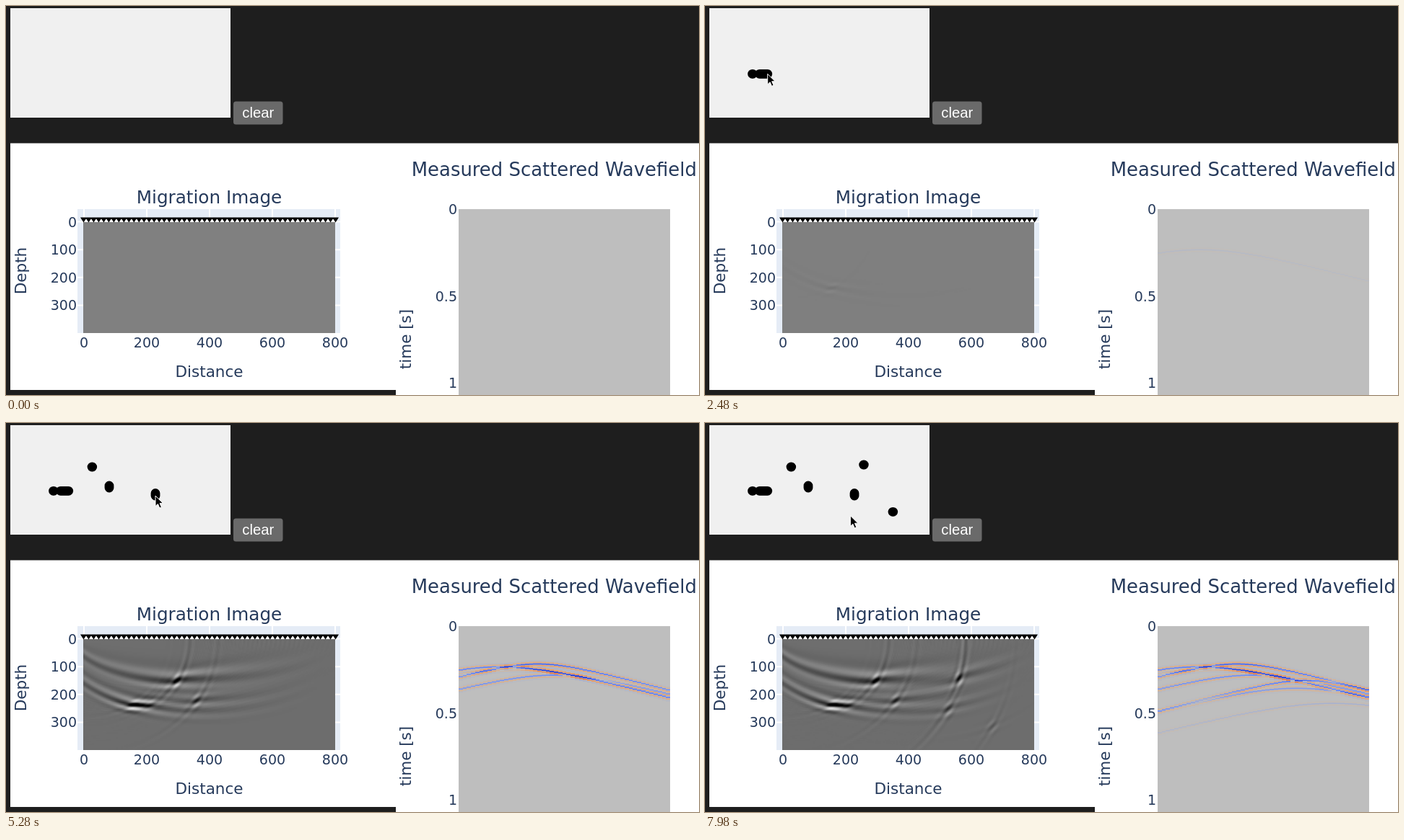
An HTML page with a canvas for the animation above (8000 ms loop, 960 by 540 pixels).

```html
<!DOCTYPE html>
<html lang="en">
<head>
<meta charset="utf-8">
<title>Migration demo</title>
<style>
  html, body { margin: 0; width: 100%; height: 100%; overflow: hidden; background: #1e1e1e; }
  svg, canvas { position: absolute; left: 0; top: 0; }
  #image { left: 107px; top: 299px; width: 349px; height: 154.5px; }
  #wave { left: 627px; top: 282px; width: 293px; height: 258px; image-rendering: pixelated; }
  text { font-family: "DejaVu Sans", Verdana, sans-serif; fill: #263a5b; }
  .tick { font-size: 19px; }
  .axis { font-size: 21.5px; }
  .mid { text-anchor: middle; }
  .end { text-anchor: end; }
  #clear { font: 20.3px "Liberation Sans", Arial, sans-serif; fill: #fff; }
  .line { fill: none; stroke: #ccc; stroke-width: 3; }
</style>
</head>
<body>
<svg width="960" height="540" viewBox="0 0 960 540">
  <rect width="960" height="540" fill="#1e1e1e"/>
  <rect x="6" y="3" width="305" height="152" fill="#f0f0f0"/>
  <rect id="button" x="315" y="132.500" width="68.500" height="32" rx="3.500"/>
  <text id="clear" class="mid" x="349.300" y="155">clear</text>
  <path d="M6 190.500H960V540H540V533H6z" fill="#fff"/>
  <rect x="99" y="282" width="364" height="172" fill="#e5ecf6"/>
  <path id="grid" stroke="#fff" stroke-width="2"/>
  <g id="labels"></g>
  <text class="mid" x="281.500" y="274" font-size="24.700">Migration Image</text>
  <text class="mid" x="759.300" y="236" font-size="25.900">Measured Scattered Wavefield</text>
  <text class="mid axis" x="281.500" y="514.500">Distance</text>
  <text class="mid axis" transform="translate(27.500 367.500) rotate(-90)">Depth</text>
  <text class="mid axis" transform="translate(561 462.500) rotate(-90)">time [s]</text>
</svg>
<canvas id="image" width="200" height="100"></canvas>
<canvas id="wave" width="51" height="258"></canvas>
<svg width="960" height="540" viewBox="0 0 960 540">
  <rect x="107" y="296" width="349" height="4" fill="#fff"/>
  <path id="receivers"/>
  <g id="toolbar" fill="#ccc">
    <path d="M49 205h6l2-4h10l2 4h6v17h-26z"/>
    <circle cx="62" cy="212.500" r="5" stroke="#fff" stroke-width="2.500"/>
    <g stroke="#7d7d7d" fill="none">
      <circle cx="118.500" cy="208.500" r="8.500" stroke-width="3.500"/>
      <path d="M125 215l7 7" stroke-width="4.500"/>
      <rect x="115" y="205" width="7" height="7" stroke-width="2"/>
    </g>
    <path class="line" d="M167 201v20M157 211h20"/>
    <path d="M167 197l5 6h-10zM167 225l5-6h-10zM153.500 211l6-5v10zM180.500 211l-6-5v10z"/>
    <rect class="line" x="202.500" y="200" width="23" height="22" stroke-dasharray="4 3.500"/>
    <path class="line" d="M254 213C247 207 253 200 262 200S274 206 270 211 257 216 253 212 250 217 255 221"/>
    <path d="M308 200h23v22h-23zM355 200h23v22h-23z"/>
    <path d="M319.500 204v14M312.500 211h14M359.500 211h14" stroke="#fff" stroke-width="4"/>
    <path class="line" d="M402 205v-6h6M418 199h6v6M424 217v6h-6M408 223h-6v-6"/>
    <path class="line" d="M406 204l14 14M420 204l-14 14"/>
    <path d="M448 211.500l12-11 12 11-1.500 1.500-10.500-9.500-10.500 9.500zM451.500 213l8.500-7.500 8.500 7.500v8h-6v-6h-5v6h-6z"/>
    <rect x="506" y="198" width="24" height="24" rx="4" fill="#000"/>
  </g>
  <g id="strokes" stroke="#000" stroke-width="12.800" stroke-linecap="round"></g>
  <g id="cursor">
    <path id="arrow" d="M0 0V14.500L3.400 11.400 5.800 17 8.400 15.900 6 10.400H10.500Z" stroke="#fff"/>
    <path id="hand" d="M-2.500 2Q-2-1 0-1T2 2V6.500L7.500 8Q9 9 8.500 11L7 18H-1L-5.500 11Q-6 8.500-3.500 9L-1.500 11Z"
      fill="#fff" stroke="#000" stroke-width="1.500"/>
  </g>
</svg>
<script>
const LOOP = 8000, RECEIVERS = 51, ROWS = 258, RATE = 241;
const SPEED = 2500, DELAY = 0.022, COLS = 200, DEPTHS = 100, CELL = 4;
const WAIT = 280, FADE = 450, LEAD = 150;
const el = id => document.getElementById(id);
const clamp = v => Math.min(1, Math.max(0, v));
const mixTo = (a, b, f) => a + (b - a) * f;
const smooth = u => u * u * (3 - 2 * u);

// A pointer stop or brush stroke: when it starts, where, how far and how long it drags.
const stop = (from, x, y, { dx = 0, dy = 0, ms = 0 } = {}) => ({ from, to: from + ms, x, y, dx, dy });
const dab = (from, x, y, drag) => stop(from, x, y, { dx: 0.7, ms: 40, ...drag });

const strokes = [
  dab(2160, 65.5, 94.3, { ms: 10 }),
  dab(2200, 75.5, 94.3, { dx: 11.2, ms: 100 }),
  dab(2940, 119, 61),
  dab(3800, 143, 87, { dx: 0, dy: 3, ms: 80 }),
  dab(4600, 207, 97.5, { dx: 0, dy: 3.5, ms: 680 }),
  dab(6440, 219.6, 58),
  dab(7520, 260, 123.3)
];
const stops = [
  stop(960, 0, 450), stop(1300, 313, 212), stop(1680, 335, 140, { ms: 180 }), stop(1900, 254, 119),
  ...strokes, stop(LOOP, 199, 129)
];

const wavelet = s => -Math.cos(2 * Math.PI * 50 * s + 0.3) * Math.exp(-((s / 0.012) ** 2));
const receiverX = r => r * 800 / (RECEIVERS - 1);

// Travel times run from the shot at the origin to the scatterer and up to each receiver.
function record({ x, y, dx, dy }) {
  const data = new Float32Array(RECEIVERS * ROWS);
  for (const part of [0, 1]) {
    const px = (x + dx * part - 6) / 0.381, pz = (y + dy * part - 3) / 0.381;
    const down = Math.hypot(px, pz);
    for (let r = 0; r < RECEIVERS; r++) {
      const up = Math.hypot(px - receiverX(r), pz);
      const gain = 64 / Math.sqrt(down * up);
      const arrival = (down + up) / SPEED + DELAY;
      for (let i = 0; i < ROWS; i++) data[r * ROWS + i] += gain * wavelet(i / RATE - arrival);
    }
  }
  return data;
}

function migrate(data) {
  const out = new Float32Array(COLS * DEPTHS);
  const sharp = data.map((v, k) => 2 * v - (data[k - 1] || 0) - (data[k + 1] || 0));
  for (let k = 0; k < out.length; k++) {
    const x = (k % COLS + 0.5) * CELL, z = (Math.floor(k / COLS) + 0.5) * CELL;
    const down = Math.hypot(x, z);
    for (let r = 0; r < RECEIVERS; r++) {
      const dx = x - receiverX(r);
      const row = ((down + Math.sqrt(dx * dx + z * z)) / SPEED + DELAY) * RATE;
      const i = Math.floor(row), at = r * ROWS + i;
      const taper = Math.min(1, (Math.min(r, RECEIVERS - 1 - r) + 1) / 4);
      if (i < ROWS - 1) out[k] += taper * mixTo(sharp[at], sharp[at + 1], row - i);
    }
  }
  return out;
}

for (const s of strokes) {
  s.data = record(s);
  s.image = migrate(s.data);
}

function mix(key, amps) {
  const sum = new Float32Array(strokes[0][key].length);
  strokes.forEach((s, n) => {
    if (amps[n]) for (let k = 0; k < sum.length; k++) sum[k] += amps[n] * s[key][k];
  });
  return sum;
}
const peak = a => a.reduce((m, v) => Math.max(m, Math.abs(v)), 0);
const basePeak = peak(mix("image", [1, 1]));

const scale = [
  [0, 5, 10, 172], [0.35, 106, 137, 247], [0.5, 190, 190, 190],
  [0.6, 220, 170, 132], [0.7, 230, 145, 90], [1, 178, 10, 28]
];
function colour(v) {
  const u = clamp((v + 1) / 2);
  const n = Math.max(1, scale.findIndex(s => u <= s[0]));
  const a = scale[n - 1], b = scale[n], f = (u - a[0]) / (b[0] - a[0]);
  return [1, 2, 3].map(c => mixTo(a[c], b[c], f));
}

function paint(id, pixel) {
  const canvas = el(id), ctx = canvas.getContext("2d");
  const pic = ctx.createImageData(canvas.width, canvas.height);
  for (let k = 0; k < canvas.width * canvas.height; k++) pic.data.set([...pixel(k), 255], k * 4);
  ctx.putImageData(pic, 0, 0);
}

let shown = "";
function drawPlots(t) {
  const amps = strokes.map(s => clamp((t - s.to - WAIT) / FADE));
  if (shown === String(amps)) return;
  shown = String(amps);
  const image = mix("image", amps), data = mix("data", amps);
  const gain = 170 / Math.max(basePeak, peak(image)), grey = 128 - 19 * amps[0];
  paint("image", k => Array(3).fill(grey + gain * image[k]));
  paint("wave", k => colour(data[(k % RECEIVERS) * ROWS + Math.floor(k / RECEIVERS)]));
}

const dragAt = (s, t) => {
  const f = s.to > s.from ? clamp((t - s.from) / (s.to - s.from)) : 1;
  return [s.x + s.dx * f, s.y + s.dy * f];
};

// The pointer drags each stroke, rests, then eases over to the next one a little early.
function pointer(t) {
  const n = stops.findLastIndex(s => t >= s.to);
  if (n < 0) return [stops[0].x, stops[0].y];
  const here = stops[n], next = stops[n + 1];
  if (!next) return [here.x, here.y];
  const drawn = strokes.includes(here);
  const arrive = strokes.includes(next) ? Math.max(here.to, next.from - LEAD) : next.from;
  const leave = Math.min(arrive, here.to + (drawn ? WAIT : 0));
  if (t >= arrive) return dragAt(next, t);
  const [x, y] = dragAt(here, t), f = smooth(clamp((t - leave) / (arrive - leave)));
  return [mixTo(x, next.x, f), mixTo(y, next.y, f)];
}

function buildChart() {
  let grid = "", labels = "", markers = "";
  const label = (s, x, y, kind) => labels += `<text class="tick ${kind}" x="${x}" y="${y}">${s}</text>`;
  for (let i = 0; i < 5; i++) {
    const x = 108 + i * 87;
    grid += `M${x} 282V300`;
    label(i * 200, x, 474, "mid");
  }
  for (let i = 0; i < 4; i++) {
    const y = 299.5 + i * 38.65;
    grid += `M99 ${y}H463`;
    label(i * 100, 98, y + 7, "end");
  }
  [0, 0.5, 1].forEach(s => label(s, 625, 289 + s * RATE, "end"));
  for (let r = 0; r < RECEIVERS; r++) markers += `M${103 + r * 6.98} 293.500h9l-4.500 7z`;
  el("grid").setAttribute("d", grid);
  el("labels").innerHTML = labels;
  el("receivers").setAttribute("d", markers);
  el("strokes").innerHTML = strokes.map(s => `<line x1="${s.x}" y1="${s.y}"/>`).join("");
}

function frame(now) {
  const t = now % LOOP;
  drawPlots(t);
  strokes.forEach((s, n) => {
    const [x, y] = dragAt(s, t), line = el("strokes").children[n];
    line.setAttribute("x2", x + 0.01);
    line.setAttribute("y2", y);
    line.style.display = t >= s.from ? "" : "none";
  });
  const [x, y] = pointer(t), overTools = y > 198 && y < 224;
  el("cursor").setAttribute("transform", `translate(${x} ${y})`);
  el("cursor").style.display = t < stops[0].from ? "none" : "";
  el("hand").style.display = overTools ? "" : "none";
  el("arrow").style.display = overTools ? "none" : "";
  el("toolbar").style.opacity = clamp((t - 980) / 250) * clamp((1680 - t) / 250);
  el("button").setAttribute("fill", t > 1580 && t < 1920 ? "#787878" : "#6a6a6a");
  requestAnimationFrame(frame);
}

buildChart();
requestAnimationFrame(frame);
</script>
</body>
</html>
```
